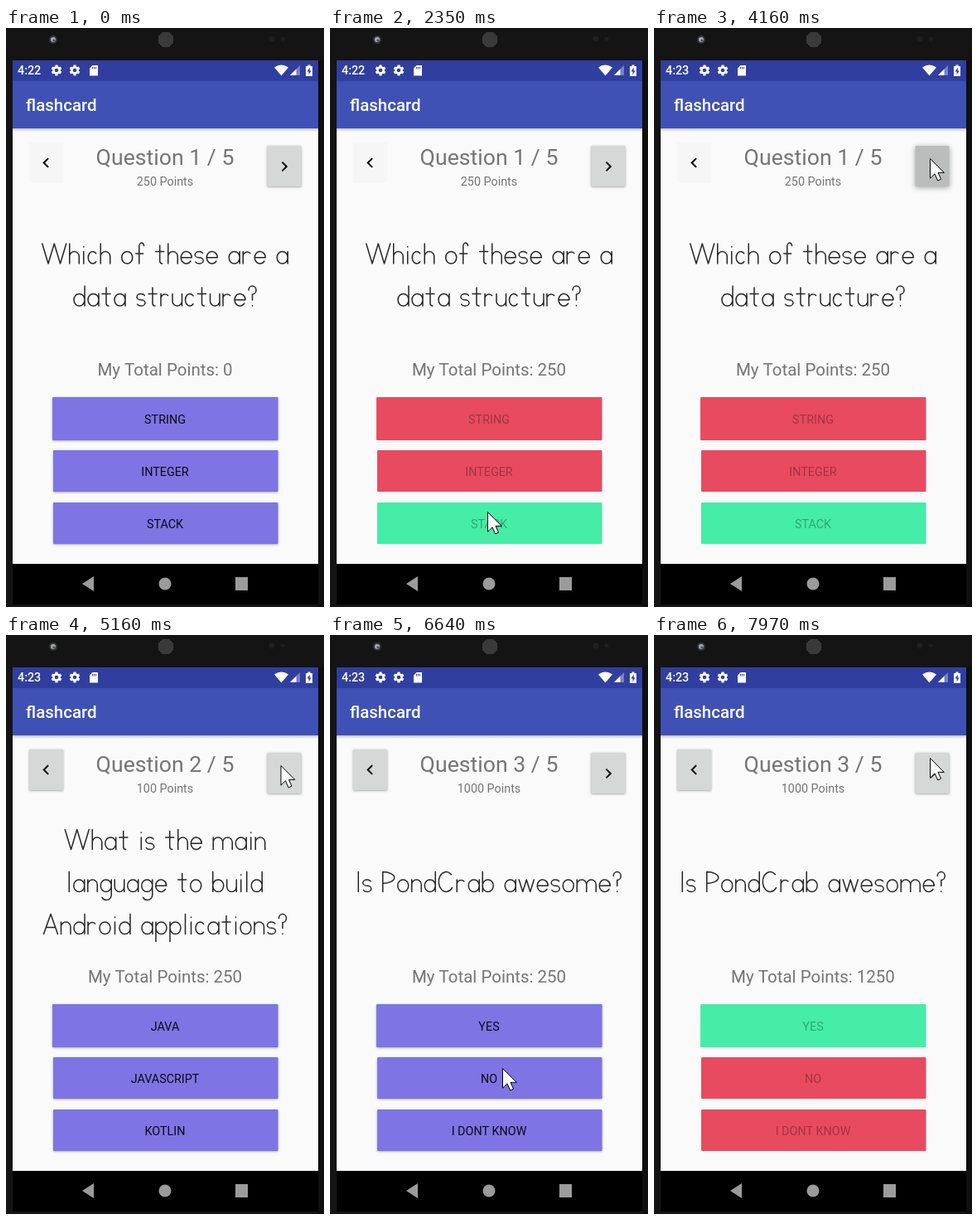
These frames come from a looping animation (384 px wide and 698 px high, 8000 ms). An HTML page with a canvas:

```html
<!DOCTYPE html>
<html lang="en">
<head>
<meta charset="utf-8">
<title>flashcard</title>
<style>
  html, body { margin: 0; width: 100%; height: 100%; overflow: hidden; background: #141414; }
  canvas { display: block; }
</style>
</head>
<body>
<canvas id="stage" width="384" height="698" role="img" aria-label="Flashcard quiz on a phone"></canvas>
<script>
const ctx = document.getElementById('stage').getContext('2d');
const LOOP = 8000, TICK = 78, TAU = Math.PI * 2;
const MID = 192;
const INK = '#262626', GREY = '#757575', VIOLET = '#7e74e4', RED = '#e84a5f', GREEN = '#45eda6';
const BLUE = '#303f9f', PLATE = '#d6d7d7';

const cards = [
  { worth: 250, lines: ['Which of these are a', 'data structure?'], answers: ['STRING', 'INTEGER', 'STACK'], right: 2 },
  { worth: 100, lines: ['What is the main', 'language to build', 'Android applications?'], answers: ['JAVA', 'JAVASCRIPT', 'KOTLIN'], right: 2 },
  { worth: 1000, lines: ['Is PondCrab awesome?'], answers: ['YES', 'NO', 'I DONT KNOW'], right: 0 }
];

// Handwriting: letters are built from a few pen strokes, y pointing up
const X = 14.5, HALF = X / 2, TALL = 24, TAIL = -9;
const BOWL = 13, ARCH = 11.5, GAP = 4, SPACE = 10;

const line = (...points) => ({
  right: Math.max(...points.map(([x]) => x)),
  draw: p => points.forEach(([x, y], i) => i ? p.lineTo(x, -y) : p.moveTo(x, -y))
});
const stem = (x, top, end = 0) => line([x, top], [x, end]);
const bar = (x, end, y) => line([x, y], [end, y]);
const zigzag = (w, h) => line(...Array.from({ length: 5 }, (_, i) => [w * i / 4, i % 2 ? 0 : h]));

// Clockwise arc; from and to are turns measured from the right
const oval = (x, y, rx, ry, from = 0, to = 1) => ({
  right: x + rx,
  draw(p) {
    p.moveTo(x + rx * Math.cos(from * TAU), -y + ry * Math.sin(from * TAU));
    p.ellipse(x, -y, rx, ry, 0, from * TAU, to * TAU);
  }
});
const bowl = (w = BOWL, from = 0, to = 1) => oval(w / 2, HALF, w / 2, HALF, from, to);
const arch = x => [oval(x + ARCH / 2, X - ARCH / 2, ARCH / 2, ARCH / 2, .5, 1), stem(x + ARCH, X - ARCH / 2)];

const letters = {
  a: [bowl(), stem(BOWL, X)],
  b: [stem(0, TALL), bowl()],
  c: [bowl(11, .12, .88)],
  d: [bowl(), stem(BOWL, TALL)],
  e: [bowl(BOWL, .1, 1), bar(0, BOWL, HALF)],
  f: [stem(4, 20), oval(7, 20, 3, 5, .5, .95), bar(0, 9, 12)],
  g: [bowl(), stem(BOWL, X, -4), oval(7, -4, 6, 6, 0, .42)],
  h: [stem(0, TALL), ...arch(0)],
  i: [stem(1.5, X), stem(1.5, 20.5, 20)],
  l: [stem(1.5, TALL)],
  m: [stem(0, X), ...arch(0), ...arch(ARCH)],
  n: [stem(0, X), ...arch(0)],
  o: [bowl()],
  p: [stem(0, X, TAIL), bowl()],
  r: [stem(0, X), oval(5, 9, 5, 5, .5, .88)],
  s: [oval(5, X * .75, 5, X / 4, .25, .92), oval(5, X / 4, 5, X / 4, .75, 1.42)],
  t: [stem(5, 22, 3), oval(8, 3, 3, 3, .25, .5), bar(0, 10, X)],
  u: [stem(0, X, 6), oval(ARCH / 2, 6, ARCH / 2, 6, 0, .5), stem(ARCH, X)],
  w: [zigzag(18, X)],
  A: [line([0, 0], [8.5, TALL], [17, 0]), bar(3, 14, 8)],
  C: [oval(9, TALL / 2, 9, TALL / 2, .1, .87)],
  I: [stem(1.5, TALL)],
  P: [stem(0, TALL), oval(0, 17, 14, 7, .75, 1.25)],
  W: [zigzag(29, TALL)],
  '?': [oval(4.5, 19, 4.5, 5, .5, 1.25), stem(4.5, 14, 7), stem(4.5, .5)]
};

const glyphs = {};
for (const ch in letters) {
  const path = new Path2D();
  letters[ch].forEach(part => part.draw(path));
  glyphs[ch] = { path, advance: Math.max(3, ...letters[ch].map(part => part.right)) + GAP };
}
const advance = ch => glyphs[ch] ? glyphs[ch].advance : SPACE;

function handwrite(text, base) {
  const total = [...text].reduce((sum, ch) => sum + advance(ch), -GAP);
  ctx.save();
  ctx.translate(MID - total / 2, base);
  ctx.strokeStyle = INK;
  ctx.lineWidth = 1.5;
  ctx.lineCap = ctx.lineJoin = 'round';
  for (const ch of text) {
    if (glyphs[ch]) ctx.stroke(glyphs[ch].path);
    ctx.translate(advance(ch), 0);
  }
  ctx.restore();
}

function box(x, y, w, h, color) {
  ctx.fillStyle = color;
  ctx.fillRect(x, y, w, h);
}

function disc(x, y, r, color) {
  ctx.fillStyle = color;
  ctx.beginPath();
  ctx.arc(x, y, r, 0, TAU);
  ctx.fill();
}

function shape(d, color) {
  ctx.fillStyle = color;
  ctx.fill(new Path2D(d));
}

function label(text, x, y, size, color, weight = 400, align = 'center') {
  ctx.font = `${weight} ${size}px Roboto, sans-serif`;
  ctx.textAlign = align;
  ctx.fillStyle = color;
  ctx.fillText(text, x, y);
}

function button(x, y, w, h, color, lift) {
  ctx.save();
  if (lift) {
    ctx.shadowColor = 'rgba(0,0,0,.36)';
    ctx.shadowBlur = lift * 2;
    ctx.shadowOffsetY = lift / 2;
  }
  ctx.fillStyle = color;
  ctx.beginPath();
  ctx.roundRect(x, y, w, h, 1);
  ctx.fill();
  ctx.restore();
}

function chevron(x, y, dir) {
  ctx.strokeStyle = '#000';
  ctx.lineWidth = 2;
  ctx.lineJoin = 'miter';
  ctx.beginPath();
  ctx.moveTo(x - 2.6 * dir, y - 5.4);
  ctx.lineTo(x + 2.8 * dir, y);
  ctx.lineTo(x - 2.6 * dir, y + 5.4);
  ctx.stroke();
}

function gear(x, y) {
  ctx.save();
  ctx.translate(x, y);
  ctx.fillStyle = '#fff';
  for (let i = 0; i < 6; i++) {
    ctx.fillRect(-1.6, -6.4, 3.2, 3.4);
    ctx.rotate(TAU / 6);
  }
  ctx.restore();
  disc(x, y, 4.9, '#fff');
  disc(x, y, 2.3, BLUE);
}

function phone() {
  box(0, 0, 384, 698, '#141414');
  box(377, 39, 7, 659, '#0f0f0f');
  disc(57, 14, 5, '#34363b');
  disc(57, 14, 3, '#a4a8b0');
  disc(58, 15, 1.6, '#4a4d55');
  disc(193, 14, 9.5, '#262626');
  for (let y = -8; y <= 8; y += 2)
    for (let x = -8; x <= 8; x += 2)
      if (Math.hypot(x, y) < 9) box(192.5 + x, 13.5 + y, 1, 1, '#777');
  disc(321, 13, 3.5, '#202022');
  disc(334, 13, 2.5, '#202022');
  box(8, 646, 369, 49, '#000');
  shape('M92 670L106 661V679Z', '#9b9b9b');
  disc(MID, 670, 7.5, '#9b9b9b');
  box(277, 662, 15, 16, '#9b9b9b');
}

function bars(clock) {
  box(8, 121, 369, 525, '#fafafa');
  const fade = ctx.createLinearGradient(0, 121, 0, 125);
  fade.addColorStop(0, 'rgba(0,0,0,.22)');
  fade.addColorStop(1, 'rgba(0,0,0,0)');
  box(8, 121, 369, 4, fade);
  box(8, 64, 369, 57, '#3f51b5');
  box(8, 39, 369, 25, BLUE);
  label(clock, 14, 56, 14.35, '#fff', 500, 'left');
  gear(61, 51);
  gear(83, 51);
  shape('M104.5 45H111V57.5H101V48.5Z', '#fff');
  for (let x = 104; x < 110; x += 2) box(x, 47, 1, 2.5, BLUE);
  shape('M332.5 57.5L324 47.5Q332.5 41.5 341 47.5Z', '#fff');
  shape('M355 45V57H343Z', 'rgba(255,255,255,.35)');
  shape('M350.5 49.5V57H343Z', '#fff');
  shape('M364.5 44.5H367.5V46H370V58H362V46H364.5Z', '#fff');
  shape('M366.8 47.5L363.6 52.6H365.6V56.5L368.5 51.4H366.8Z', BLUE);
  label('flashcard', 24, 100, 20.5, '#fff', 500, 'left');
}

function question(state) {
  const card = cards[state.card];
  const first = state.card === 0;
  button(28, 138, 41, 49, first ? '#f6f6f6' : PLATE, first ? 0 : 1.4);
  chevron(48.5, 162.5, -1);
  button(315.5, 142, 41, 49, state.next, state.held ? 3 : 1.4);
  chevron(336, 167, 1);

  label(`Question ${state.card + 1} / 5`, MID, 164.5, 26.65, GREY);
  label(`${card.worth} Points`, MID, 190, 14.35, GREY);
  card.lines.forEach((text, i) => handwrite(text, 309.5 + (i - (card.lines.length - 1) / 2) * 51));
  label(`My Total Points: ${state.points}`, MID, 418.8, 20.5, GREY);

  card.answers.forEach((answer, i) => {
    const x = i ? 57 : 56, h = i ? 50 : 52;
    const y = Math.round(445 + i * 63.5);
    const pressed = state.press === i;
    let color = pressed ? '#6d65c6' : VIOLET;
    if (state.done) color = i === card.right ? GREEN : RED;
    button(x, y, 328.5 - x, h, color, state.done ? 0 : pressed ? 3 : 1.4);
    label(answer, MID, y + h / 2 + 5.5, 14.35, state.done ? 'rgba(0,0,0,.3)' : '#0b0a14');
  });
}

// Pointer moves to x, y between two times; bowX and bowY bend the path at half way
const entry = { x: 293, y: 423 };
const moves = [
  { from: 318, to: 1100, x: 209, y: 470, bowY: 103 },
  { from: 1572, to: 1800, x: 188, y: 576 },
  { from: 1800, to: 2270, x: 190, y: 583, bowY: 20 },
  { from: 2672, to: 3126, x: 339.5, y: 82.5, bowY: -275 },
  { from: 3126, to: 3290, x: 339, y: 127 },
  { from: 3532, to: 3930, x: 333, y: 157, bowX: -20 },
  { from: 4452, to: 4530, x: 331.5, y: 157 },
  { from: 5862, to: 6636, x: 208, y: 522, bowX: -200 },
  { from: 6732, to: 7190, x: 217, y: 468, bowX: -13, bowY: -38 },
  { from: 7662, to: 7962, x: 333, y: 148 }
];

function pointerAt(t) {
  const start = moves[0].from;
  if (t < start) return null;
  const now = start + Math.floor((t - start) / TICK) * TICK;
  let { x, y } = entry;
  for (const { from, to, x: endX, y: endY, bowX = 0, bowY = 0 } of moves) {
    const p = Math.min(1, Math.max(0, (now - from) / (to - from)));
    const bend = 4 * p * (1 - p);
    x += (endX - x) * p + bowX * bend;
    y += (endY - y) * p + bowY * bend;
  }
  return { x, y };
}

const arrow = new Path2D('M.5 .5V24.2L6 18.8 9.7 27 13.5 25.2 10 17.4H17.3Z');
function pointer({ x, y }) {
  ctx.save();
  ctx.translate(x, y);
  ctx.fillStyle = '#fff';
  ctx.fill(arrow);
  ctx.strokeStyle = '#000';
  ctx.lineWidth = 1;
  ctx.lineJoin = 'miter';
  ctx.stroke(arrow);
  ctx.restore();
}

function stateAt(t) {
  const during = (a, b) => t >= a && t < b;
  const held = during(4080, 4240) || during(5240, 5390);
  const easing = during(4240, 4380) || during(5390, 5630);
  return {
    card: t < 4240 ? 0 : t < 5390 ? 1 : 2,
    points: t < 2350 ? 0 : t < 7420 ? 250 : 1250,
    done: during(2350, 4240) || t >= 7420,
    press: during(2270, 2350) ? 2 : during(7340, 7420) ? 0 : -1,
    held,
    next: held ? '#bbbcbc' : easing ? '#c8c9c9' : PLATE,
    clock: t < 2980 ? '4:22' : '4:23'
  };
}

function draw(t) {
  const state = stateAt(t);
  phone();
  bars(state.clock);
  question(state);
  const at = pointerAt(t);
  if (at) pointer(at);
}

const begin = performance.now();
function tick() {
  draw((performance.now() - begin) % LOOP);
  requestAnimationFrame(tick);
}
tick();
</script>
</body>
</html>
```
